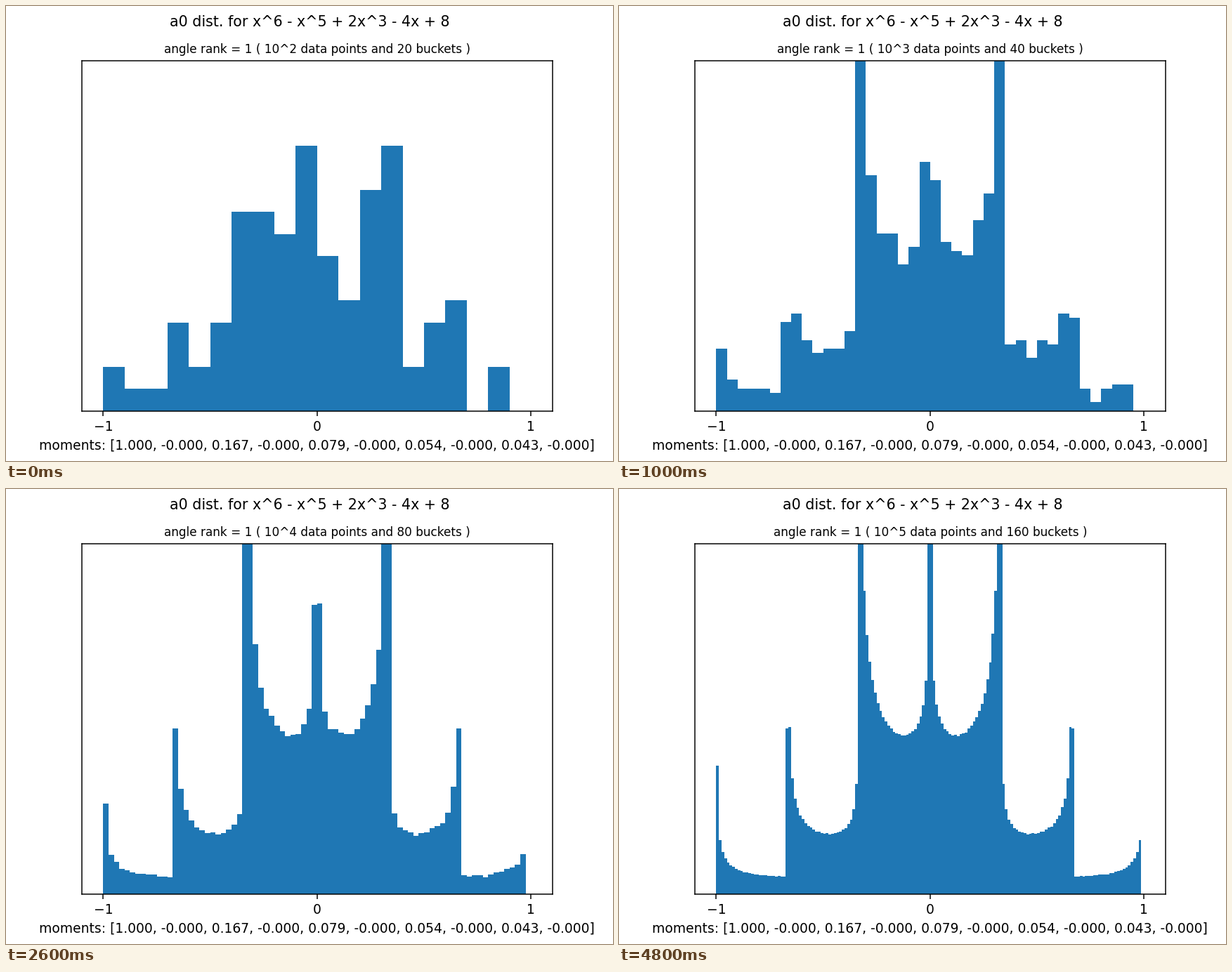
Recreate the animation shown at these times as a matplotlib script. Size 864 px wide and 648 px high, loop 6 s.

```python
import numpy as np
import matplotlib.pyplot as plt
from matplotlib.animation import FuncAnimation

plt.rcParams["font.family"] = "DejaVu Sans"

STAGES = 4
SECONDS = 6  # the last stage is held until the loop ends
MOMENTS = ("[1.000, -0.000, 0.167, -0.000, 0.079, "
           "-0.000, 0.054, -0.000, 0.043, -0.000]")

# Roots sqrt(2) * exp(+-i * angle) of x^6 - x^5 + 2x^3 - 4x + 8
ANGLES = np.array([np.arccos(1 / np.sqrt(8)), np.pi / 6, 5 * np.pi / 6])


def normalized_traces(count):
    powers = np.arange(1, count + 1)
    return np.cos(np.outer(powers, ANGLES)).mean(axis=1)


fig, ax = plt.subplots(figsize=(6.4, 4.8), dpi=135)
fig.suptitle("a0 dist. for x^6 - x^5 + 2x^3 - 4x + 8", fontsize=11)


def draw(second):
    stage = min(second, STAGES - 1)
    exponent, buckets = stage + 2, 20 * 2**stage
    # Left edges only, so the topmost bucket stays out of the histogram
    edges = np.linspace(-1, 1, buckets + 1)[:-1]

    ax.clear()
    ax.hist(normalized_traces(10**exponent), bins=edges, density=True,
            color="#1f77b4")
    ax.set(xlim=(-1.1, 1.1), ylim=(0, 1.6), xticks=[-1, 0, 1], yticks=[])
    ax.set_xlabel(f"moments: {MOMENTS}", fontsize=10)
    ax.set_title(f"angle rank = 1 ( 10^{exponent} data points "
                 f"and {buckets} buckets )", fontsize=9)


anim = FuncAnimation(fig, draw, frames=SECONDS, interval=1000,
                     init_func=lambda: None, repeat=True, repeat_delay=0)
plt.show()
```
